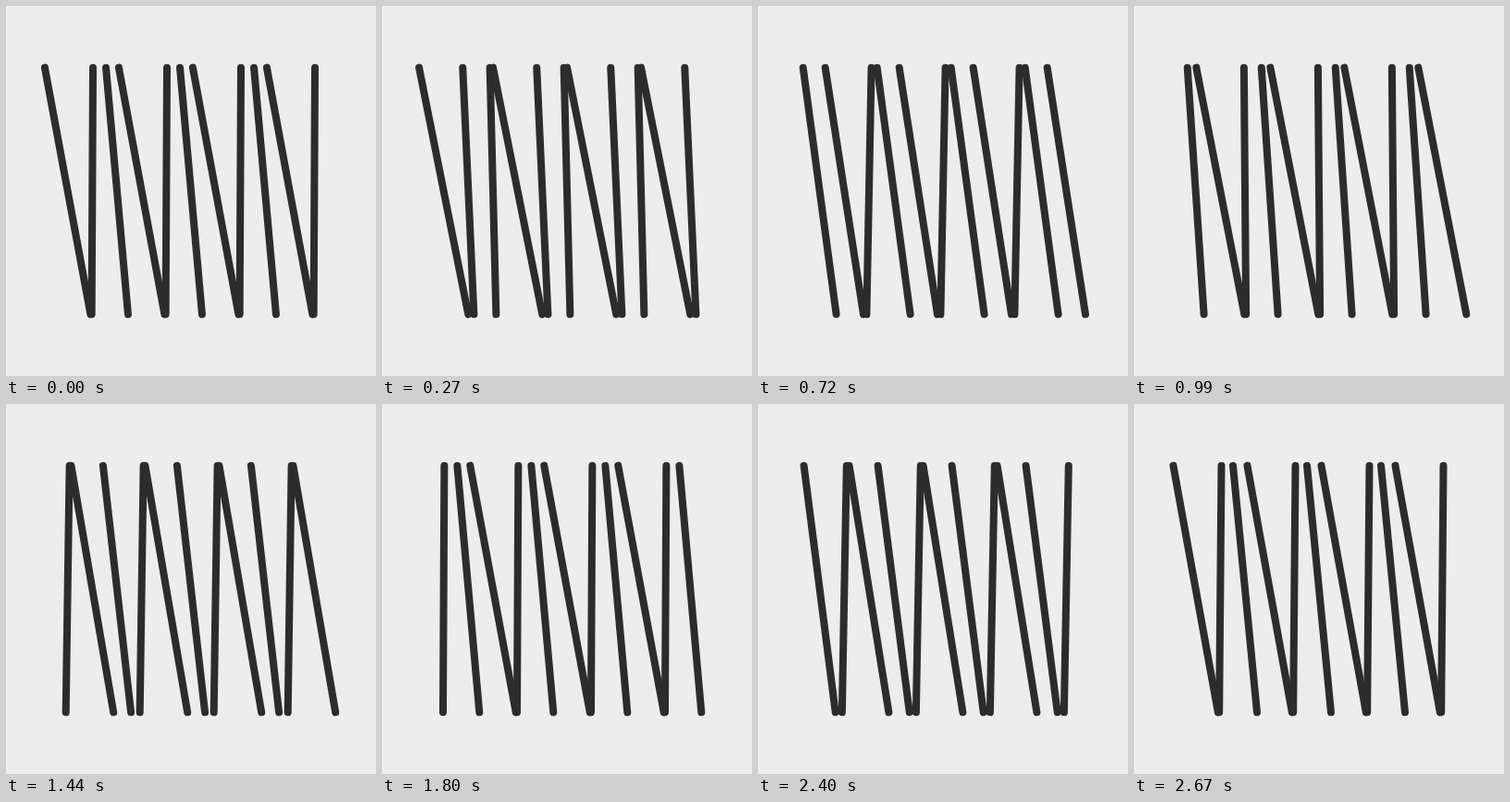
Write an HTML page with a canvas that moves like this. It is 400 by 400 pixels and loops after 2700 ms.

```html
<!DOCTYPE html>
<html>
<head>
<meta charset="utf-8">
<style>
  html, body { margin: 0; height: 100%; overflow: hidden; background: #ededed; }
  canvas { display: block; }
</style>
</head>
<body>
<canvas id="stage" width="400" height="400"></canvas>
<script>
const ctx = document.getElementById('stage').getContext('2d');
const LOOP = 2700, TAU = Math.PI * 2;
const COUNT = 11, GAP = 40, HALF = 200, SWING = 22, LEAN = 18;

function draw(now) {
  const angle = (now % LOOP) / LOOP * TAU;
  ctx.setTransform(1, 0, 0, 1, 0, 0);
  ctx.fillStyle = '#ededed';
  ctx.fillRect(0, 0, 400, 400);

  // Work in a 600-unit square centred on the stage.
  ctx.setTransform(2 / 3, 0, 0, 2 / 3, 200, 200);
  ctx.strokeStyle = '#2c2c2c';
  ctx.lineWidth = 12;
  ctx.lineCap = 'round';
  for (let i = 0; i < COUNT; i++) {
    const x = i * GAP - HALF;
    // Neighbours are a third of a turn apart; the two ends mirror each other.
    const offset = LEAN + SWING * Math.cos(angle - TAU / 12 - i * TAU / 3);
    ctx.beginPath();
    ctx.moveTo(x - offset, -HALF);
    ctx.lineTo(x + offset, HALF);
    ctx.stroke();
  }
}

function tick() {
  draw(performance.now());
  requestAnimationFrame(tick);
}
tick();
</script>
</body>
</html>
```
